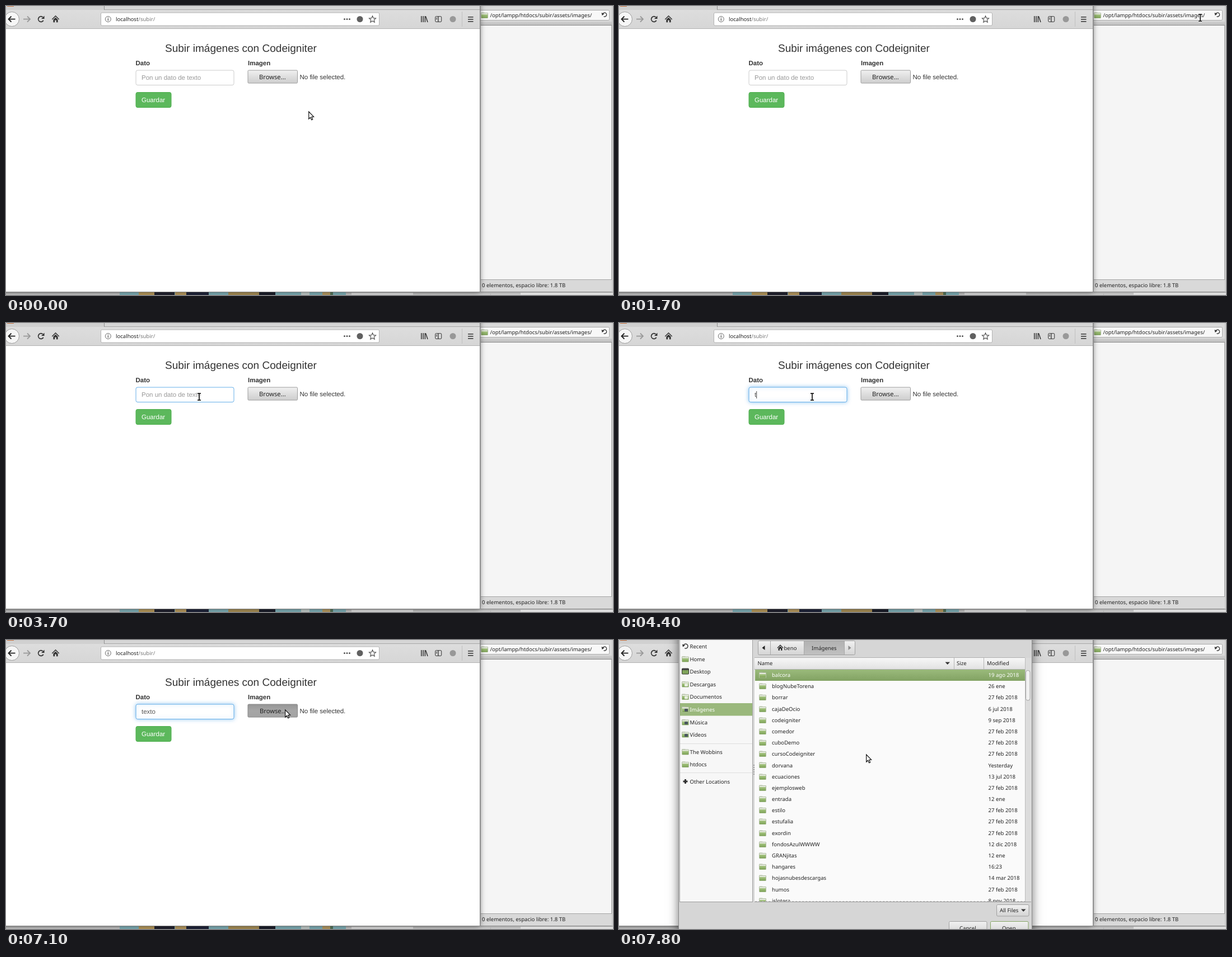
Animation, 1084 px wide and 517 px high, one loop 8000 ms. Source, as an HTML page with a canvas:

```html
<!DOCTYPE html>
<html lang="es">
<head>
<meta charset="utf-8">
<title>Subir imágenes</title>
<style>
html, body { margin: 0; width: 100%; height: 100%; overflow: hidden; background: #fff; }
canvas { display: block; }
</style>
</head>
<body>
<canvas id="stage" width="1084" height="517"></canvas>
<script>
const ctx = document.getElementById('stage').getContext('2d');
const LOOP = 8000;
const UI = '9.55px "Noto Sans", sans-serif';
const PAGE = '11.5px "Liberation Sans", Arial, sans-serif';
const INK = '#222';

// Pointer positions, each held until the next: time, x, y, shape
const POINTER = [
  [0, 540, 188], [400, 556, 182], [500, 630, 153], [600, 735, 110], [700, 840, 70],
  [800, 930, 40], [900, 974, 24], [1000, 980, 21], [1100, 991, 25, 'beam'],
  [1300, 1000, 24, 'beam'], [1400, 1011, 22, 'beam'], [1500, 1022, 21, 'beam'],
  [1600, 1031, 21, 'beam'], [1700, 1038, 21, 'beam'], [1800, 1042, 21, 'beam'],
  [2300, 930, 24], [2400, 826, 24], [2500, 709, 33], [3700, 345, 132, 'beam'],
  [6300, 361, 132, 'beam'], [6700, 498, 124], [7800, 441, 204]
];
const TYPED = [[0, ''], [4400, 't'], [4800, 'te'], [5200, 'text'], [5900, 'texto']];

const PLACES = [
  ['Recent', 11, 'recent'], ['Home', 34], ['Desktop', 56, 'desktop'], ['Descargas', 79, 'mark'],
  ['Documentos', 101.5, 'mark'], ['Imágenes', 124, 'dark'], ['Música', 147, 'dark'],
  ['Vídeos', 169, 'dark'], ['The Wobbins', 200], ['htdocs', 222.5], ['Other Locations', 253, 'plus']
];
const FEB = '27 feb 2018';
const FILES = [
  ['balcora', '19 ago 2018'], ['blogNubeTorena', '26 ene'], ['borrar', FEB],
  ['cajaDeOcio', '6 jul 2018'], ['codeigniter', '9 sep 2018'], ['comedor', FEB],
  ['cuboDemo', FEB], ['cursoCodeigniter', FEB], ['dorvana', 'Yesterday'],
  ['ecuaciones', '13 jul 2018'], ['ejemplosweb', FEB], ['entrada', '12 ene'],
  ['estilo', FEB], ['estufalia', FEB], ['exordin', FEB], ['fondosAzulWWWW', '12 dic 2018'],
  ['GRANjitas', '12 ene'], ['hangares', '16:23'], ['hojasnubesdescargas', '14 mar 2018'],
  ['humos', FEB], ['islotera', '8 nov 2018']
];

const at = (keys, t) => keys.filter(k => k[0] <= t).pop();

function rect(x, y, w, h, fill) {
  ctx.fillStyle = fill;
  ctx.fillRect(x, y, w, h);
}
function box(x, y, w, h, r, fill, stroke) {
  ctx.beginPath();
  ctx.roundRect(x, y, w, h, r);
  if (fill) { ctx.fillStyle = fill; ctx.fill(); }
  if (stroke) { ctx.strokeStyle = stroke; ctx.lineWidth = 1; ctx.stroke(); }
}
function text(s, x, y, font = UI, fill = INK) {
  ctx.font = font;
  ctx.fillStyle = fill;
  ctx.fillText(s, x, y);
}
function path(points, { fill, stroke, width = 1.5, close = false } = {}) {
  ctx.beginPath();
  points.forEach(([x, y]) => ctx.lineTo(x, y));
  if (close || fill) ctx.closePath();
  if (fill) { ctx.fillStyle = fill; ctx.fill(); }
  if (stroke) { ctx.strokeStyle = stroke; ctx.lineWidth = width; ctx.stroke(); }
}
function arc(x, y, r, { from = 0, to = Math.PI * 2, fill, stroke, width = 1 }) {
  ctx.beginPath();
  ctx.arc(x, y, r, from, to);
  if (fill) { ctx.fillStyle = fill; ctx.fill(); }
  if (stroke) { ctx.strokeStyle = stroke; ctx.lineWidth = width; ctx.stroke(); }
}
function fade(y0, y1, ...colors) {
  const g = ctx.createLinearGradient(0, y0, 0, y1);
  colors.forEach((c, i) => g.addColorStop(i / (colors.length - 1), c));
  return g;
}
function shadowed(blur, color, draw) {
  ctx.save();
  ctx.shadowBlur = blur;
  ctx.shadowColor = color;
  draw();
  ctx.restore();
}

function folder(x, y) {
  box(x + .5, y + .5, 6, 3, .5, '#b4bfa6');
  box(x + .5, y + 1.5, 12, 9, .5, '#e6eadf', '#b3bfa5');
  rect(x + 1, y + 4, 11, 6.5, fade(y + 4, y + 10.5, '#a9c785', '#7ba153'));
}
function home(x, y, fill, scale = 1) {
  ctx.save();
  ctx.translate(x, y);
  ctx.scale(scale, scale);
  path([[-6.5, .5], [0, -6], [6.5, .5]], { stroke: fill, width: 1.6 });
  path([[-4.3, 1], [0, -3.2], [4.3, 1], [4.3, 6], [1.4, 6],
    [1.4, 2], [-1.4, 2], [-1.4, 6], [-4.3, 6]], { fill });
  ctx.restore();
}
function turnBack(x, y, r) {
  arc(x, y, r, { from: -2.6, to: 2, stroke: '#333', width: 1.4 });
  path([[x - r - 2, y - 3.5], [x - r + 3, y - 1.5], [x - r - 1, y + 1.5]], { fill: '#333' });
}

function drawBackdrop() {
  rect(0, 0, 1084, 517, '#d9d9d9');
  rect(0, 511, 1084, 6, fade(511, 517, '#a4a4a4', '#cfcfcf'));
  rect(203, 512, 404, 5, '#7fb0b8');
  for (const [x, w, c] of [
    [237, 28, '#b89a5c'], [265, 36, '#22222e'], [302, 20, '#b99b60'], [322, 40, '#20243a'],
    [397, 55, '#a98f56'], [452, 29, '#1c1e2b'], [527, 15, '#c4cdcb'], [565, 14, '#b79b62'],
    [579, 5, '#55755b']
  ]) rect(x, 512, w, 5, c);
  rect(617, 513, 110, 4, '#dedede');
  rect(865, 513, 1, 4, '#b5b5b5');
  rect(919, 513, 165, 4, '#dedede');
}

function drawFileManager() {
  rect(848, 0, 234, 511, '#d9d9d9');
  box(840.5, 7.5, 237, 18, 2, '#f8f8f8', '#a9a9a9');
  folder(848, 11);
  text('/opt/lampp/htdocs/subir/assets/images/', 864.5, 19.8);
  turnBack(1069, 15.5, 3.5);
  rect(848, 28, 234, 7, fade(28, 35, '#cecece', '#bdbdbd'));
  rect(848, 34, 234, 1, '#8f8f8f');
  rect(848, 35, 233, 454, '#f5f5f5');
  rect(1081, 35, 1, 455, '#a5a5a5');
  rect(848, 489, 234, 1, '#a5a5a5');
  text('0 elementos, espacio libre: 1.8 TB', 850, 503);
  rect(848, 511, 235, 1, '#8c8c8c');
  rect(1082, 0, 1, 512, '#c2c2c2');
}

function drawToolbar(menuHover) {
  rect(0, 0, 846, 8, '#d0d0d0');
  rect(176, 0, 670, 7, '#d6d6d6');
  rect(175, 0, 1, 7, '#909090');
  rect(176, 6, 670, 1, '#a6a6a6');
  rect(2, 0, 12, 1, '#c9713d');
  rect(0, 7, 846, 33, fade(7, 40, '#dddddd', '#d6d6d6'));
  rect(0, 40, 846, 1, '#b3b3b3');

  arc(10.5, 23.5, 13, { fill: '#f6f6f6', stroke: '#9a9a9a' });
  const arrow = (x, d, stroke) => {
    path([[x - 6 * d, 23.5], [x + 6 * d, 23.5]], { stroke, width: 1.8 });
    path([[x + d, 18.5], [x + 6 * d, 23.5], [x + d, 28.5]], { stroke, width: 1.8 });
  };
  arrow(10.5, -1, '#222');
  arrow(37, 1, '#999');
  arc(62.5, 23.5, 4.8, { from: .5, to: 5.4, stroke: '#333', width: 1.8 });
  path([[68.5, 17.5], [68.5, 23], [63, 23]], { fill: '#333' });
  home(88.5, 23.5, '#333', .95);

  box(169.5, 12, 497, 23, 2, '#fff', '#b2b2b2');
  arc(182.3, 23.5, 5, { stroke: '#666' });
  rect(181.7, 22.5, 1.3, 4, '#555');
  rect(181.7, 20.3, 1.3, 1.3, '#555');
  text('localhost', 196, 27);
  const hostWidth = ctx.measureText('localhost').width;
  text('/subir/', 196 + hostWidth, 27, UI, '#777');
  for (const x of [604.5, 609, 613.5]) arc(x, 23.5, 1.5, { fill: '#555' });
  arc(632, 23.5, 5.5, { fill: '#606060' });
  const star = Array.from({ length: 10 }, (_, i) => {
    const r = i % 2 ? 2.9 : 6.3, a = i * Math.PI / 5 - Math.PI / 2;
    return [654.5 + r * Math.cos(a), 24 + r * Math.sin(a)];
  });
  path(star, { stroke: '#555', width: 1.2, close: true });

  for (const x of [741, 744.3, 747.6]) rect(x, 18, 1.5, 11, '#333');
  path([[749.5, 18.5], [753, 29]], { stroke: '#333' });
  box(766.7, 18.7, 11, 9.6, 1.5, null, '#333');
  rect(771.2, 19, 1.3, 9, '#333');
  rect(768, 21, 2, 1, '#333');
  rect(768, 23, 2, 1, '#333');
  arc(798, 23.5, 5.5, { fill: '#989898' });
  rect(814, 10, 1, 27, '#c0c0c0');
  if (menuHover) box(818, 12, 23, 23, 2, '#c1c1c1');
  for (const y of [19, 23, 27]) rect(825, y, 9.5, 1.5, '#333');
}

function drawForm(t) {
  const typed = at(TYPED, t)[1], focused = t >= 3700, pressed = t >= 7100;
  text('Subir imágenes con Codeigniter', 284, 81.5, '19.05px "Liberation Sans", Arial, sans-serif', '#333');
  text('Dato', 231.5, 106, 'bold ' + PAGE, '#333');
  text('Imagen', 432, 106, 'bold ' + PAGE, '#333');

  const field = () => box(232, 115, 175, 26.5, 3, '#fff', focused ? '#66afe9' : '#ccc');
  shadowed(t >= 4000 ? 7 : 0, 'rgba(102,175,233,.7)', field);
  if (typed) text(typed, 242, 132.3, PAGE, '#555');
  else text('Pon un dato de texto', 242, 132.3, PAGE, '#999');
  if (t >= 4000 && t < 6300) {
    ctx.font = PAGE;
    rect(242 + ctx.measureText(typed).width, 122, 1, 13, '#444');
  }

  box(232, 154.5, 63, 27, 3, '#5cb85c', '#4cae4c');
  text('Guardar', 242, 172, PAGE, '#fff');

  box(432, 115, 88.5, 23, 1.5,
    pressed ? fade(115, 138, '#959595', '#a6a6a6', '#a3a3a3') : fade(115, 138, '#f1f1f1', '#dedede', '#cecece'),
    pressed ? '#868686' : '#9c9c9c');
  text('Browse...', pressed ? 453 : 452, 131, '11.2px "Noto Sans", sans-serif');
  text('No file selected.', 524.5, 131, PAGE, '#333');
}

function drawBrowser(t) {
  shadowed(10, 'rgba(0,0,0,.55)', () => rect(-20, -20, 866, 531, '#fff'));
  drawToolbar(t >= 2500 && t < 3700);
  drawForm(t);
  rect(846, 0, 1.5, 512, '#858585');
  rect(0, 511, 847, 1, '#8c8c8c');
}

function drawPlaces() {
  rect(108, 0, 131, 468, '#f7f7f7');
  rect(108, 0, 1, 468, '#a2a2a2');
  rect(238, 0, 1, 468, '#a2a2a2');
  rect(108, 468, 131, 1, '#9c9c9c');
  rect(109, 113, 129, 22.5, '#9ab87c');
  rect(109, 185, 129, 1, '#dedede');
  rect(109, 237, 129, 1, '#dedede');
  for (const [name, y, icon] of PLACES) {
    text(name, 126.5, y + 3.5, UI, name === 'Imágenes' ? '#fff' : INK);
    if (icon === 'recent') turnBack(119, y, 4);
    else if (icon === 'plus') {
      rect(114.5, y - 1.5, 8, 3, '#333');
      rect(117, y - 4, 3, 8, '#333');
    } else if (icon === 'desktop') {
      box(112.5, y - 5, 12, 10, 1, '#7fa45a', '#333');
      rect(113, y - 5, 11, 3, '#444');
    } else {
      folder(112, y - 5.5);
      if (icon) box(117, y - 1, 6, 5, 1, icon === 'dark' ? '#4a5560' : '#e8eee0');
    }
  }
}

function drawPathBar() {
  box(248.5, 1.5, 173, 25, 2, fade(2, 27, '#f0f0f0', '#d4d4d4'), '#a0a0a0');
  rect(330, 2, 72, 24, fade(2, 26, '#b2b2b2', '#c0c0c0'));
  for (const x of [270, 330, 402]) rect(x, 2, 1, 24, '#a8a8a8');
  path([[260.5, 10], [255.5, 14], [260.5, 18]], { fill: '#222' });
  home(288, 14, '#222', .8);
  text('beno', 294.5, 17.5);
  text('Imágenes', 344, 17.5);
  path([[409.5, 10], [414.5, 14], [409.5, 18]], { fill: '#8d8d8d' });
}

function drawFileList(allIcons) {
  rect(242, 32, 494, 437, '#fafafa');
  rect(242, 32, 483, 20, fade(32, 52, '#f7f7f7', '#e2e2e2'));
  rect(242, 31, 483, 1, '#b0b0b0');
  rect(242, 52, 483, 1, '#b0b0b0');
  rect(598, 32, 1, 20, '#b5b5b5');
  rect(651, 32, 1, 20, '#b5b5b5');
  text('Name', 247.5, 45);
  text('Size', 603, 45);
  text('Modified', 657, 45);
  path([[582.5, 39.5], [591, 39.5], [586.7, 44]], { fill: '#333' });

  ctx.save();
  ctx.beginPath();
  ctx.rect(242, 52, 483, 416);
  ctx.clip();
  rect(243, 53, 482, 20, fade(53, 73, '#9aba7b', '#82a263'));
  FILES.forEach(([name, date], i) => {
    const y = 62.5 + i * 20.18, fill = i ? INK : '#fff';
    if (allIcons || !i) folder(250, Math.round(y - 5.5));
    text(name, 273, y + 3.6, UI, fill);
    text(date, 659.5, y + 3.6, UI, fill);
  });
  ctx.restore();

  for (let x = 243; x < 725; x += 6) rect(x, 467, 3.5, 1, '#bbb');
  rect(725, 32, 11, 437, '#dcdcdc');
  rect(725, 32, 1, 437, '#bcbcbc');
  box(726.5, 54.5, 7.5, 53.5, 3.5, '#f1f1f1', '#a2a2a2');
  rect(242, 468, 494, 1, '#9c9c9c');
}

function drawDialog(t) {
  shadowed(18, 'rgba(0,0,0,.6)', () => rect(107, -20, 630, 560, '#d6d6d6'));
  rect(106, 0, 1, 517, '#888');
  rect(737, 0, 1, 517, '#888');
  drawPlaces();
  for (let y = 223; y < 243; y += 4) rect(240, y, 2, 2, '#999');
  drawPathBar();
  drawFileList(t >= 7800);

  const face = y => fade(y, y + 21, '#f2f2f2', '#d4d4d4');
  box(674.5, 473.5, 57.5, 20.5, 2, face(473), '#a0a0a0');
  text('All Files', 680, 487);
  path([[718, 481.5], [726.5, 481.5], [722.2, 486]], { fill: '#333' });
  box(589.5, 503.5, 67.5, 22, 2, face(503), '#a0a0a0');
  text('Cancel', 608, 518.5);
  box(663.5, 503.5, 67.5, 22, 2, face(503), '#86a566');
  text('Open', 684, 518.5);
}

function drawPointer([, x, y, shape]) {
  if (shape === 'beam') {
    const strokes = [[[-3, -6], [3, -6]], [[0, -6], [0, 6]], [[-3, 6], [3, 6]]];
    for (const [stroke, width] of [['#fff', 3.6], ['#111', 1.7]])
      for (const s of strokes) path(s.map(([a, b]) => [x + a, y + b]), { stroke, width });
    return;
  }
  const outline = [[.7, 1], [.7, 14], [3.6, 11.2], [5.6, 15.8], [7.7, 14.9], [5.8, 10.4], [9.6, 10.2]];
  path(outline.map(([a, b]) => [x + a, y + b]), { fill: '#fff', stroke: '#111', width: 1.2 });
}

function draw() {
  const t = performance.now() % LOOP;
  ctx.textRendering = 'geometricPrecision';
  drawBackdrop();
  drawFileManager();
  drawBrowser(t);
  if (t >= 7500) drawDialog(t);
  drawPointer(at(POINTER, t));
  requestAnimationFrame(draw);
}
draw();
</script>
</body>
</html>
```
